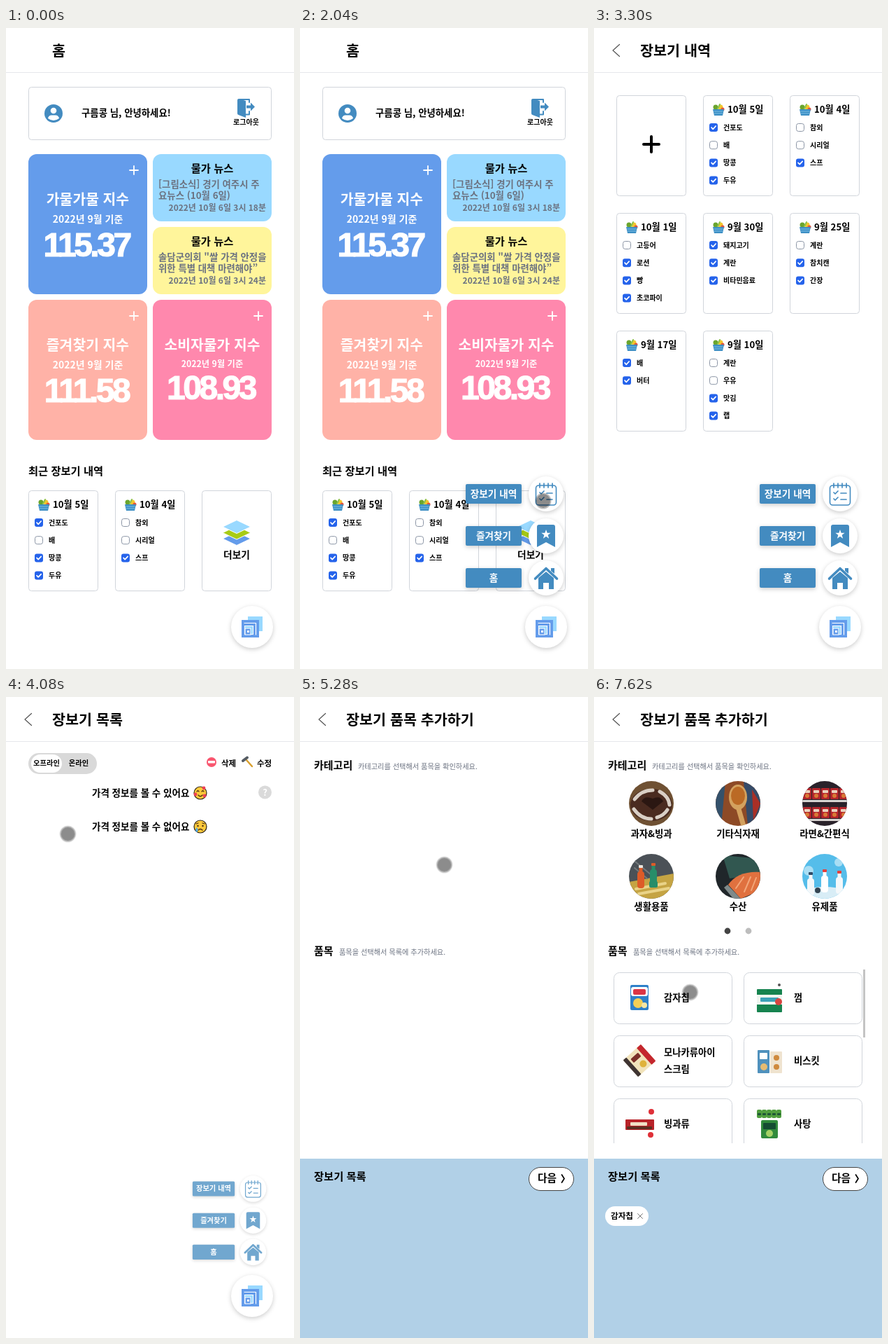
An HTML page that plays this animation: 412x915 px, repeating every 8 s.

```html
<!DOCTYPE html>
<html lang="ko">
<head>
<meta charset="utf-8">
<title>장보기</title>
<style>
html, body { margin: 0; width: 100%; height: 100%; overflow: hidden; background: #fff; }
svg { display: block; width: 100%; height: 100%; }
text { font-family: "Noto Sans CJK KR", "Noto Sans CJK", sans-serif; font-weight: 700; white-space: pre; }
.mid { text-anchor: middle; }
.end { text-anchor: end; }
.white { fill: #fff; }
.gray { fill: #6b7280; }
.hint { fill: #6b7280; font-weight: 400; }
.num { font-family: "Liberation Sans", sans-serif; letter-spacing: -3.5px; stroke: #fff; stroke-width: 1.2px; }
.box { fill: #fff; stroke: #d1d5db; }
.line { fill: none; stroke-linecap: round; stroke-linejoin: round; }
.shadow { filter: drop-shadow(0 2px 3px rgba(0, 0, 0, .2)); }

.step { animation: 8s step-end infinite; }
#home { animation-name: home; }
#list { animation-name: list; }
#detail { animation-name: detail; }
#add { animation-name: add; }
#categories { animation-name: categories; }
#items { animation-name: items; }
#chip { animation-name: chip; }
#fab { animation-name: fab; }
#touch { animation-name: touch; }
#menu { transform-origin: 358px 815px; animation: menu 8s linear infinite; }

@keyframes home { 0% { opacity: 1 } 30%, to { opacity: 0 } }
@keyframes list { 0% { opacity: 0 } 30% { opacity: 1 } 48.25%, to { opacity: 0 } }
@keyframes detail { 0% { opacity: 0 } 48.25% { opacity: 1 } 63.25%, to { opacity: 0 } }
@keyframes add { 0% { opacity: 0 } 63.25%, to { opacity: 1 } }
@keyframes categories { 0% { opacity: 0 } 66.5%, to { opacity: 1 } }
@keyframes items { 0% { opacity: 0 } 82%, to { opacity: 1 } }
@keyframes chip { 0% { opacity: 0 } 94.25%, to { opacity: 1 } }
@keyframes fab { 0% { opacity: 1 } 63.25%, to { opacity: 0 } }
@keyframes menu {
  0%, 15.5% { transform: scale(0); opacity: 0; animation-timing-function: cubic-bezier(.1, .4, .2, 1) }
  20.25% { transform: scale(1); opacity: 1 }
  49.3% { transform: scale(1); opacity: 1; animation-timing-function: ease-in }
  53.25%, to { transform: scale(0); opacity: 0 }
}
@keyframes touch {
  0% { transform: translate(320px, 854px); opacity: 0 }
  11.25% { transform: translate(320px, 854px); opacity: 1 }
  12% { transform: translate(334px, 849px); opacity: 1 }
  13% { transform: translate(343px, 846px); opacity: 1 }
  20% { transform: translate(343px, 846px); opacity: 0 }
  24% { transform: translate(348px, 693px); opacity: 1 }
  24.75% { transform: translate(348px, 683px); opacity: 1 }
  25.5% { transform: translate(348px, 675px); opacity: 1 }
  39.75% { transform: translate(354px, 675px); opacity: .5 }
  40.5% { transform: translate(354px, 675px); opacity: 0 }
  42.5% { transform: translate(150px, 252px); opacity: .5 }
  43.25% { transform: translate(150px, 252px); opacity: 0 }
  46.25% { transform: translate(88.5px, 195.5px); opacity: 1 }
  57.25% { transform: translate(110px, 206px); opacity: 1 }
  58% { transform: translate(130px, 215px); opacity: 1 }
  58.75% { transform: translate(147px, 221px); opacity: 1 }
  61.5% { transform: translate(206.5px, 239.5px); opacity: 1 }
  70% { transform: translate(220px, 255px); opacity: 1 }
  71% { transform: translate(226px, 268px); opacity: 1 }
  72.25% { transform: translate(222px, 276px); opacity: 1 }
  75.5% { transform: translate(190px, 252px); opacity: 1 }
  75.75% { transform: translate(155px, 229px); opacity: 1 }
  76.25% { transform: translate(155px, 229px); opacity: 0 }
  79.5% { transform: translate(99px, 172px); opacity: 1 }
  80% { transform: translate(82px, 166px); opacity: 1 }
  85.75% { transform: translate(82px, 166px); opacity: 0 }
  91.5%, to { transform: translate(137.5px, 421.5px); opacity: 1 }
}
</style>
</head>
<body>
<svg id="stage" viewBox="0 0 412 915"></svg>
<script>
const BLUE = '#438bc0', SKY = '#99d9ff', CORN = '#649ceb';

// Text is placed by its vertical centre.
const text = (str, x, cy, size, cls = '') =>
  `<text x="${x}" y="${cy + size * .37}" font-size="${size}" class="${cls}">${str}</text>`;
const rect = (x, y, w, h, r, attrs) =>
  `<rect x="${x}" y="${y}" width="${w}" height="${h}" rx="${r}" ${attrs}/>`;
const circle = (x, y, r, attrs) => `<circle cx="${x}" cy="${y}" r="${r}" ${attrs}/>`;
const path = (d, fill) => `<path d="${d}" fill="${fill}"/>`;
const line = (d, color, width = 1) =>
  `<path class="line" d="${d}" stroke="${color}" stroke-width="${width}"/>`;
const at = (x, y, body, attrs = '') => `<g transform="translate(${x} ${y})" ${attrs}>${body}</g>`;
const group = (id, body) => `<g id="${id}" class="step">${body}</g>`;
const plus = (x, y, arm, color, width) => line(`M${x - arm} ${y}h${2 * arm}M${x} ${y - arm}v${2 * arm}`, color, width);

const header = (title, back = true) =>
  rect(0, 0, 412, 915, 0, 'fill="#fff"') + rect(0, 63, 412, 1, 0, 'fill="#e5e7eb"') +
  (back ? line('M36.5 23.5L27 32L36.5 40.5', '#555', 1.2) : '') + text(title, 66, 32, 20.7);

const basket =
  circle(-4, -4, 3.5, 'fill="#6aa52e"') + circle(3, -4, 3.5, 'fill="#f3c62c"') +
  circle(6, -1, 2.5, 'fill="#e2533d"') + line('M-1 -2L2 -8', '#8bc34a', 2) +
  path('M-8 -1H8L6 8H-6Z', '#3d8fc4') + line('M-6 2H6M-5.5 5H5.5', '#7cc0e8');

const check = (x, y, on) => on
  ? rect(x - 6, y - 6, 12, 12, 3, 'fill="#2563eb"') + line(`M${x - 3} ${y}l2.2 2.3l4 -4.3`, '#fff', 1.7)
  : rect(x - 5.5, y - 5.5, 11, 11, 3, 'fill="#fff" stroke="#8b95a5"');

// Entries starting with "-" are unchecked.
const shopCard = (x, y, date, entries) => at(x, y,
  rect(.5, .5, 99, 143, 4, 'class="box"') + at(22, 21, basket) + text(date, 35, 20.5, 13.2) +
  entries.split(' ').map((entry, i) => {
    const on = entry[0] !== '-', cy = 46 + i * 25.2;
    return check(15, cy, on) + text(on ? entry : entry.slice(1), 29, cy, 10);
  }).join(''));

const indexCard = (x, y, color, name, value, dateSize, valueY) => at(x, y,
  rect(0, 0, 170, 200, 12, `fill="${color}"`) + plus(151, 23, 6, '#fff', 1.8) +
  text(name, 85, 64, 20.4, 'mid white') + text('2022년 9월 기준', 85, dateSize > 13 ? 93 : 91, dateSize, 'mid white') +
  text(value, 83, valueY, 48, 'mid white num'));

const newsCard = (y, color, first, second, date) => at(210, y,
  rect(0, 0, 170, 96, 12, `fill="${color}"`) + text('물가 뉴스', 85, 20, 15.3, 'mid') +
  text(first, 8, 43, 13.4, 'gray') + text(second, 8, 59, 13.4, 'gray') + text(date, 162, 77, 12, 'end gray'));

const layer = (y, color) =>
  `<path d="M330 ${y - 9.5}L350 ${y}L330 ${y + 9.5}L310 ${y}Z" fill="${color}" stroke="#fff" stroke-linejoin="round"/>`;

const home = header('홈', false) +
  rect(32.5, 84.5, 347, 75, 4, 'class="box"') +
  circle(68, 122, 13, `fill="${BLUE}"`) + circle(68, 118, 4.3, 'fill="#fff"') +
  path('M60 129Q61 124.5 65 124.5H71Q75 124.5 76 129Q68 135 60 129Z', '#fff') +
  text('구름콩 님, 안녕하세요!', 108, 121.5, 13.4) +
  path('M333 101L343 104V128L332.500 124Q331 123.500 331 122V103Q331 101 333 101Z', BLUE) +
  line('M334 102H348V106M348 119V123.500H343', BLUE, 2) +
  path('M344 110.500H350V106.500L356 112.500L350 118.500V114.500H344Z', BLUE) +
  text('로그아웃', 343.5, 134.5, 10, 'mid') +
  indexCard(32, 180, CORN, '가물가물 지수', '115.37', 14, 128) +
  indexCard(32, 388, '#ffb2a7', '즐겨찾기 지수', '111.58', 14, 128) +
  indexCard(210, 388, '#ff88ad', '소비자물가 지수', '108.93', 12.3, 124) +
  newsCard(180, SKY, '[그림소식] 경기 여주시 주', '요뉴스 (10월 6일)', '2022년 10월 6일 3시 18분') +
  newsCard(284, '#fff59b', '솔담군의회 "쌀 가격 안정을', '위한 특별 대책 마련해야”', '2022년 10월 6일 3시 24분') +
  text('최근 장보기 내역', 32, 632.5, 15.3) +
  shopCard(32, 660, '10월 5일', '건포도 -배 땅콩 두유') +
  shopCard(156, 660, '10월 4일', '-참외 -시리얼 스프') +
  rect(280.5, 660.5, 99, 143, 4, 'class="box"') +
  layer(729, CORN) + layer(720.5, '#a8cc16') + layer(712, SKY) +
  text('더보기', 330, 751.5, 13.7, 'mid');

const list = header('장보기 내역') +
  rect(32.5, 96.5, 99, 143, 4, 'class="box"') + plus(82, 166, 11, '#000', 4) +
  shopCard(156, 96, '10월 5일', '건포도 -배 땅콩 두유') +
  shopCard(280, 96, '10월 4일', '-참외 -시리얼 스프') +
  shopCard(32, 264, '10월 1일', '-고등어 로션 빵 초코파이') +
  shopCard(156, 264, '9월 30일', '돼지고기 계란 비타민음료') +
  shopCard(280, 264, '9월 25일', '-계란 참치캔 간장') +
  shopCard(32, 432, '9월 17일', '배 버터') +
  shopCard(156, 432, '9월 10일', '-계란 -우유 맛김 랩');

const face = circle(0, 0, 9, 'fill="#fcc93a" stroke="#2b2114" stroke-width="1.2"');
const happy = face + line('M-5 -2q1.5 -2.5 3 0M2 -2q1.5 -2.5 3 0M-3 3q3 3.5 6 0', '#4a2b14', 1.3) +
  [[-7, 2], [6, 4], [5, -7]].map(([x, y]) => circle(x, y, 2.4, 'fill="#ee4055"')).join('');
const sad = face + line('M-3 5q3 -3 6 0M-6 -4l3 -1M6 -4l-3 -1', '#4a2b14', 1.3) +
  circle(-3.5, -1, 1.2, 'fill="#4a2b14"') + circle(3.5, -1, 1.2, 'fill="#4a2b14"') +
  path('M-5 1Q-8.5 6 -5 8Q-2 6 -5 1Z', '#4aa8e8');

const detail = header('장보기 목록') +
  rect(32, 80, 98, 30, 15, 'fill="#d9d9d9"') + rect(36, 82, 44, 26, 13, 'fill="#fff"') +
  text('오프라인', 58, 94.5, 10.3, 'mid') + text('온라인', 104, 94.5, 10.3, 'mid') +
  circle(294, 93, 7, 'fill="#f9566f"') + rect(289, 91, 10, 3.5, 1, 'fill="#fff"') +
  text('삭제', 308, 94.5, 11.5) +
  line('M344 90L352 99', '#d9a02f', 2.5) + line('M339 91L345 86.5', '#555c63', 4) +
  text('수정', 359, 94.5, 11.5) +
  text('가격 정보를 볼 수 있어요', 123, 137.5, 13.5) + at(278, 137, happy) +
  text('가격 정보를 볼 수 없어요', 123, 185.5, 13.5) + at(278, 185, sad) +
  circle(370.5, 136, 9.5, 'fill="#dadada"') + text('?', 370.5, 136, 13, 'mid white');

const fill = color => rect(-32, -32, 64, 64, 0, `fill="${color}"`);
const bottle = (x, y, color, cap) =>
  rect(x - 5, y, 10, 24, 4, `fill="${color}"`) + rect(x - 2.5, y - 6, 5, 9, 1, `fill="${color}"`) +
  rect(x - 3, y - 9, 6, 4, 1, `fill="${cap}"`);
const shelf = y => [-25, -12, 1, 14, 27].map(x => rect(x - 6, y, 12, 16, 1, 'fill="#b3252b"') +
  rect(x - 4, y + 3, 8, 4, 1, 'fill="#ead2bd"') + circle(x, y + 11, 3, 'fill="#d97a35"')).join('') +
  rect(-32, y + 17, 64, 3, 0, 'fill="#d9d5d2"');

const photos = [
  fill('#6f5133') + `<ellipse cy="2" rx="30" ry="23" fill="#4a2b20"/>` +
    line('M-24 -6Q-14 -19 2 -19M12 -17Q25 -10 26 2M-25 8Q-15 22 0 22M8 20Q18 17 23 9', '#d9cfc5', 5) +
    path('M2 9L-14 -3Q-10 -12 2 -7Q13 -12 17 -3Z', '#2b1712'),
  fill('#8d4a26') + path('M8 -32H32V32H14Z', '#354b68') + path('M-32 -32H-18L-24 32H-32Z', '#34516b') +
    path('M20 -20L32 0L22 25Z', '#a92f26') +
    `<ellipse cy="-9" rx="13" ry="18" fill="#d3a15e"/><ellipse cy="-11" rx="10" ry="13" fill="#bb6a25"/>` + line('M1 8L8 32', '#d3a15e', 7),
  fill('#29222a') + shelf(-22) + shelf(5),
  fill('#4b5157') + path('M-32 8L32 -4V32H-32Z', '#c5a443') + line('M-28 -25L0 -2M-24 -12L-6 3', '#74797b', 2) +
    line('M-22 18L20 10M-18 25L25 17', '#e9d388', 4) + bottle(-15, -7, '#dd5b28', '#e9e6df') + bottle(3, -10, '#278d69', '#dd5b28') + rect(-3, 7, 12, 9, 2, 'fill="#278d69"'),
  fill('#20262a') + path('M-22 -30L32 -25V-3L-12 3Z', '#315750') + path('M-14 12Q0 -8 32 -6V20L4 32Z', '#e0713f') +
    line('M-3 17L8 1M9 22L18 1M19 20L26 2', '#f2a679', 2) + path('M-15 12L4 32L-5 34L-20 16Z', '#7f8a8a'),
  fill('#55bdea') + path('M-32 20Q0 10 32 20V32H-32Z', '#d8edf6') + circle(-23, -8, 7, 'fill="#a9def4"') + circle(20, -20, 6, 'fill="#a9def4"') +
    bottle(0, -1, '#fff', '#e6403c') + bottle(21, 1, '#f4f8fa', '#e6403c') + bottle(-20, 3, '#f4f8fa', '#2f4a66') + circle(-10, 20, 4, 'fill="#344552"')
];
const categoryNames = ['과자&amp;빙과', '기타식자재', '라면&amp;간편식', '생활용품', '수산', '유제품'];
const categories = categoryNames.map((name, i) => at(82 + i % 3 * 124, 152 + Math.floor(i / 3) * 104,
    `<g clip-path="url(#round)">${photos[i]}</g>` + text(name, 0, 43.5, 13.4, 'mid'))).join('') +
  circle(191, 334, 4.4, 'fill="#444"') + circle(221, 334, 4.4, 'fill="#bdbdbd"');

const products = [
  rect(-13, -18, 26, 36, 2, 'fill="#2e80c9"') + rect(-12, -15, 24, 13, 3, 'fill="#fff"') + rect(-9, -12, 18, 8, 2, 'fill="#dc3545"') +
    circle(-2, 8, 7, 'fill="#f4cf55"') + circle(7, 11, 4, 'fill="#f7e7a4"'),
  rect(-18, -12, 36, 33, 1, 'fill="#16834f"') + rect(-18, -4, 36, 14, 0, 'fill="#eef5ef"') + rect(-13, 0, 26, 6, 1, 'fill="#3ca2b8"') +
    circle(13, 6, 5, 'fill="#d84440"') + circle(14, -18, 2, 'fill="#555"'),
  rect(-17, -16, 34, 32, 2, 'fill="#f1e3bb"') + rect(9, -16, 8, 32, 1, 'fill="#c4272e"') + rect(-17, -16, 6, 32, 1, 'fill="#3f3432"') +
    rect(-8, -10, 14, 7, 1, 'fill="#7b3028"') + circle(1, 7, 5, 'fill="#dfb23c"'),
  rect(-17, -15, 17, 33, 1, 'fill="#4f91bd"') + rect(1, -13, 17, 31, 1, 'fill="#efe3cf"') + rect(-14, -11, 11, 9, 1, 'fill="#fff"') +
    circle(-8, 9, 5, 'fill="#e5bb72"') + circle(10, -4, 4, 'fill="#cf8a3e"') + circle(10, 9, 4, 'fill="#cf8a3e"'),
  rect(-20, -6, 41, 15, 1, 'fill="#b82329"') + rect(-13, -2, 24, 5, 1, 'fill="#f0dfc5"') + rect(-18, 4, 36, 4, 1, 'fill="#5c2f22"') +
    circle(17, -17, 4, 'fill="#df3038"') + circle(16, 16, 4, 'fill="#df3038"'),
  [-15, -8, -1, 6, 13].map(x => rect(x - 3, -20, 7, 12, 2, 'fill="#4f9d3e"') + rect(x - 2, -15, 5, 3, 1, 'fill="#1f5637"')).join('') +
    rect(-12, -5, 24, 26, 2, 'fill="#318b3c"') + rect(-9, -1, 18, 9, 1, 'fill="#154d32"') + circle(0, 14, 5, 'fill="#a6d266"')
];
products[2] = `<g transform="rotate(-42)">${products[2]}</g>`;
const itemNames = ['감자칩', '껌', '모나카류아이 스크림', '비스킷', '빙과류', '사탕'];
const items = itemNames.map((name, i) => {
  const lines = name.split(' ');
  return at(28 + i % 2 * 186, 393 + Math.floor(i / 2) * 90,
    rect(.5, .5, 169, 73, 8, 'class="box"') + at(37, 36, products[i]) +
    lines.map((part, n) => text(part, 72, 36.5 + (n - (lines.length - 1) / 2) * 24, 13.3)).join(''));
}).join('');

const add = header('장보기 품목 추가하기') +
  text('카테고리', 20, 97, 15) + text('카테고리를 선택해서 품목을 확인하세요.', 83, 99, 10.2, 'hint') +
  text('품목', 20, 362, 15) + text('품목을 선택해서 목록에 추가하세요.', 56, 364, 10.2, 'hint') +
  group('categories', categories) +
  group('items', `<g clip-path="url(#scroll)">${items}</g>` + rect(385, 389, 3, 97, 0, 'fill="#c4c4c4"')) +
  rect(0, 659, 412, 256, 0, 'fill="#b1d0e7"') + text('장보기 목록', 20, 684, 15.3) +
  rect(327.5, 671.5, 64, 33, 16.5, 'fill="#fff" stroke="#444"') + text('다음', 340, 687, 14.7) +
  line('M374.5 682L378 687.5L374.5 693', '#000', 1.7) +
  group('chip', rect(16, 727, 62, 28, 14, 'fill="#fff"') + text('감자칩', 24, 741, 11.6) +
    line('M62.5 737.5l7 7m0 -7l-7 7', '#777'));

const star = Array.from({ length: 10 }, (_, i) => {
  const r = i % 2 ? 2.8 : 7, a = (i * 36 - 90) * Math.PI / 180;
  return `${r * Math.cos(a)},${r * Math.sin(a) - 2}`;
}).join(' ');
const checklist = rect(-14.5, -12, 29, 28, 4, `fill="none" stroke="${BLUE}" stroke-width="1.6"`) +
  line('M-9 -15v6M-3 -15v6M3 -15v6M9 -15v6M-9 -2l2 2l4 -4M-9 7l2 2l4 -4M1 -1h8M1 8h8', BLUE, 1.7);
const bookmark = path('M-13 -13Q-13 -16 -10 -16H10Q13 -16 13 -13V16L0 9L-13 16Z', BLUE) + `<polygon points="${star}" fill="#fff"/>`;
const house = path('M-11 0L0 -9L11 0V16H4V7H-4V16H-11Z', BLUE) + path('M7 -14H12V-6L7 -10Z', BLUE) +
  line('M-15.5 1L0 -13.5L15.5 1', BLUE, 3.6);
const action = (y, label, icon) =>
  rect(237, y - 14, 80, 28, 2, `fill="${BLUE}" class="shadow"`) + text(label, 277, y - .5, 13.6, 'mid white') +
  circle(352, y, 25, 'fill="#fff" class="shadow"') + at(352, y, icon);

const fab = `<g id="menu">${action(665, '장보기 내역', checklist)}${action(725, '즐겨찾기', bookmark)}${action(785, '홈', house)}</g>` +
  circle(352, 855, 30, 'fill="#fff" class="shadow"') +
  rect(346, 840, 21, 21, 0, `fill="${SKY}"`) + rect(337, 845, 25, 25, 0, `fill="${CORN}"`) +
  line('M341 849.5H357.5V866', '#fff', 1.2) +
  rect(341.5, 853.5, 12, 12, 0, `fill="${SKY}" stroke="#fff"`) + rect(342, 857, 8, 9, 0, `fill="${CORN}" stroke="#fff"`) +
  rect(345, 860, 3, 3, 0, 'fill="#fff"');

document.getElementById('stage').innerHTML =
  `<defs><clipPath id="round"><circle r="32"/></clipPath>
  <clipPath id="scroll"><rect x="20" y="389" width="372" height="248"/></clipPath></defs>` +
  group('home', home) + group('list', list) + group('detail', detail) + group('add', add) + group('fab', fab) +
  group('touch', circle(0, 0, 10, 'fill="#000" fill-opacity=".45"') +
    circle(0, 0, 10.7, 'fill="none" stroke="#000" stroke-opacity=".25" stroke-width="1.6"'));
</script>
</body>
</html>
```
